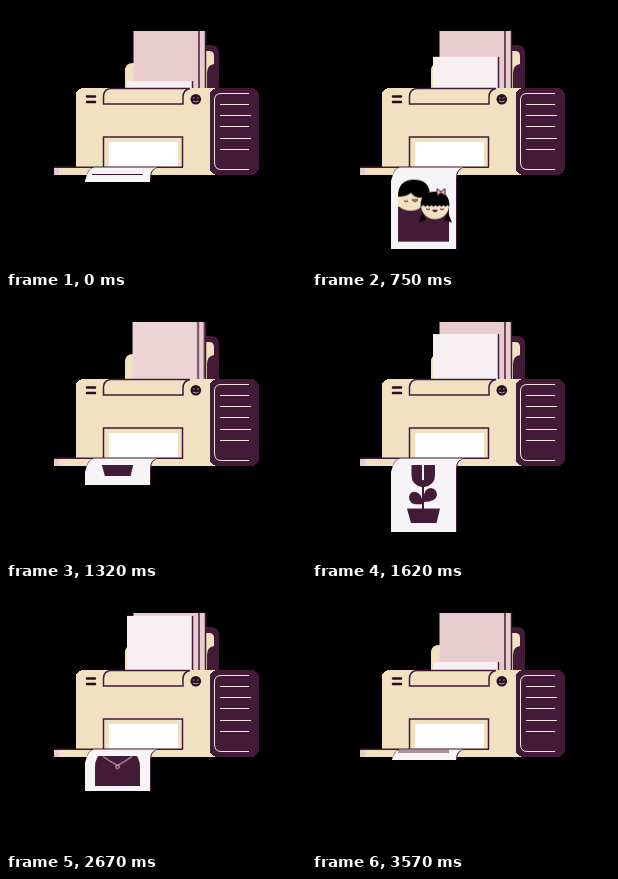
These frames come from a looping animation (300x263 px, 3600 ms). An HTML page:

```html
<!DOCTYPE html>
<html lang="en">
<head>
<meta charset="utf-8">
<title>Photo printer</title>
<style>
html, body { margin: 0; width: 100%; height: 100%; overflow: hidden; background: #000; }
svg { display: block; width: 100vw; height: 100vh; }
.cream { fill: #f0e2c0; }
.pink { fill: #e9cccf; }
.plum { fill: #431a37; }
.white { fill: #f7f4f7; }
.line { fill: none; stroke: #431a37; stroke-width: 1.5; }
.thin { fill: none; stroke: #431a37; }
.crisp { shape-rendering: crispEdges; }

/* Feeder: the stack steps forward, then the front sheet is pulled in */
.feed { animation: feed 1.2s linear -1.1s infinite; }
.shift { animation: shift 1.2s linear -1.1s infinite; }
@keyframes feed {
  0% { transform: translate(7px, 25px); fill: #e9cccf; }
  8.33% { transform: translate(0, 25px); fill: #f7f0f3; }
  16.67% { transform: translate(0, 29px); }
  24.17% { transform: translate(0, 35px); }
  26.67% { transform: translate(0, 37px); }
  36.67% { transform: translate(0, 39px); }
  51.67% { transform: translate(0, 50px); }
  61.67% { transform: translate(0, 53px); }
  76.67%, 79.17% { transform: translate(0, 63px); }
  89.17% { transform: translate(0, 74px); }
  91.67% { transform: translate(0, 75px); fill: #f7f0f3; }
  100% { transform: translate(0, 82px); fill: #f7f0f3; }
}
@keyframes shift {
  0% { transform: translateX(7px); }
  8.33%, 100% { transform: none; }
}

/* Photos: step out over the tray, rest, then drop */
.out, .hair, .band { animation: out 3.6s linear calc(var(--i) * 1.2s - 3.78s) infinite; }
@keyframes out {
  0%, .28% { transform: translateY(79px); }
  .83% { transform: translateY(84px); }
  4.17% { transform: translateY(90px); }
  5% { transform: translateY(94px); }
  6.67% { transform: translateY(96px); }
  10.56% { transform: translateY(120px); }
  13.33% { transform: translateY(122px); }
  15.83% { transform: translateY(145px); }
  16.67% { transform: translateY(153px); }
  20% { transform: translateY(155px); }
  25% { transform: translateY(156px); }
  28.33% { transform: translateY(174px); }
  33.33% { transform: translateY(227px); }
  34.17% { transform: translateY(248px); }
  35.28%, 100% { transform: translateY(268px); }
}
.hair { animation-name: hair; animation-timing-function: step-end; }
@keyframes hair { 0% { fill: #efb4b8; } 20%, 100% { fill: #000; } }
.band { animation-name: band; animation-timing-function: step-end; }
@keyframes band { 0% { opacity: 0; } 2% { opacity: .45; } 4.6%, 100% { opacity: 0; } }
</style>
</head>
<body>
<svg viewBox="0 0 300 263" preserveAspectRatio="none">
  <defs>
    <clipPath id="curl"><path d="M88 161.5H151Q144 163 144 172V263H79V175Q82 162 88 161.5Z"/></clipPath>
    <clipPath id="rim"><path d="M88 161H153Q145 163 145 172V263H79V175Q82 161 88 161Z"/></clipPath>
    <clipPath id="below"><path d="M79 168H145V263H79Z"/></clipPath>
    <path id="sheet" d="M0 0H65V75H0Z"/>
    <path id="paper" d="M79 0H154V82H79Z"/>
  </defs>

  <!-- paper feeder -->
  <path class="plum" d="M190 82V39H205Q213 39 213 47V82Z"/>
  <path class="cream" d="M199 45H203Q208 45 208 50V58Q201 59 201 67V82H199Z"/>
  <path class="cream" d="M119 82V65Q119 57 127 57H195V82Z"/>
  <use href="#sheet" class="pink" x="134" y="25"/>
  <path class="line" d="M199.500 25V82"/>
  <g class="shift pink">
    <use href="#sheet" x="127.500" y="25"/>
    <path class="line" d="M193 25V82"/>
  </g>
  <g class="feed">
    <use href="#sheet" x="121"/>
    <path class="line" d="M186.500 0V75"/>
  </g>

  <!-- printer body -->
  <path class="cream crisp" d="M78 82H215V169H48V161H70V90Q70 82 78 82Z"/>
  <path class="pink crisp" d="M48 162H53V169H48Z"/>
  <path class="line" d="M97.500 98V90Q98 83 105 82.500H184Q177 84 177 91V98Z"/>
  <path d="M81 90.500h8M81 96h8" stroke="#2a0d22" stroke-width="2.500" stroke-linecap="round"/>
  <circle cx="189.800" cy="93.300" r="5.300" fill="#2a0d22"/>
  <path d="M187 92h1.500M191 92h1.500M187 95q2.800 2 5.600 0" fill="none" stroke="#f0e2c0" stroke-width=".7"/>
  <path class="line" d="M97.500 161V131H176.500V161"/>
  <path fill="#fff" d="M103 136H172V160.500H103Z"/>
  <path class="line" d="M48 161.300H177"/>
  <rect class="plum crisp" x="203.500" y="82" width="49.500" height="87" rx="8"/>
  <path d="M243 87.500H215Q208.500 87.500 208.500 94V156Q208.500 163.500 215 163.500H243" fill="none" stroke="#f3e6dc"/>
  <path d="M214 98.500H243M214 109.500H245M214 120.500H243M214 132.500H245M214 143.500H243" stroke="#f3e6dc" stroke-width="1.200"/>

  <!-- couple -->
  <g style="--i:0">
    <g clip-path="url(#rim)"><use href="#paper" class="out plum crisp"/></g>
    <g clip-path="url(#curl)"><use href="#paper" class="out white crisp"/></g>
    <path class="band plum" d="M86 161.500H137V165H86Z"/>
    <g clip-path="url(#below)"><g class="out">
      <path class="plum" d="M86 75V40H137V75Z"/>
      <path class="cream" d="M86 26H113V34Q109 44 99 44Q91 44 86 39Z"/>
      <path class="hair" d="M86 30Q86 13 102 13Q118 13 118 29L109 31Q102 31 99 26Q95 30 86 30Z"/>
      <path class="thin" d="M92 34q2 2 4 0M100 33h6q-3 4-6 0"/>
      <path d="M110 46L107 56L114 53ZM136 46L140 56L132 53Z"/>
      <circle class="cream" cx="123" cy="38.500" r="14"/>
      <path d="M108.500 40Q108 25 123 25Q138 25 137.500 40l-2-1.500-2 1.500-2-1.500-2 1.500-2-1.500-2 1.500-2-1.500-2 1.500-2-1.500-2 1.500-2-1.500-2 1.500-2-1.500Z"/>
      <path class="thin" d="M114 42q2 2 4 0M128 42q2 2 4 0"/>
      <path class="plum" d="M120 43h6q-3 5-6 0Z"/>
      <path d="M125 22l4 3 4-3v7l-4-3-4 3Z" fill="#efb4b8" stroke="#431a37"/>
    </g></g>
  </g>

  <!-- potted tulip -->
  <g style="--i:1">
    <g clip-path="url(#rim)"><use href="#paper" class="out plum crisp"/></g>
    <g clip-path="url(#curl)"><use href="#paper" class="out white crisp"/></g>
    <g clip-path="url(#below)"><g class="out plum">
      <path d="M99.500 15H110V37Q99.500 35 99.500 25ZM112 15H123V25Q123 35 112 37Z"/>
      <path d="M110 30h2v30h-2Z"/>
      <path d="M110.500 54Q97 56 97 47Q98 41 104 42Q110 43 110.500 54ZM111.500 52Q111 38 119 38Q125 39 125 45Q124 52 111.500 52Z"/>
      <path d="M95 58.500H128L124.500 73H99Z"/>
    </g></g>
  </g>

  <!-- dog -->
  <g style="--i:2">
    <g clip-path="url(#rim)"><use href="#paper" class="out plum crisp"/></g>
    <g clip-path="url(#curl)"><use href="#paper" class="out white crisp"/></g>
    <g clip-path="url(#below)"><g class="out">
      <path class="plum" d="M89 77V58Q89 46 98 42V26Q99 14 111.500 14Q124 14 125 26V42Q134 46 134 58V77Z"/>
      <path d="M99 17Q89 21 89 32Q90 39 95 39Q99 35 98 26ZM124 17Q134 21 134 32Q133 39 128 39Q124 35 125 26Z"/>
      <circle class="white" cx="104" cy="26" r="1.800"/>
      <circle class="white" cx="118.500" cy="26" r="1.800"/>
      <path class="white" d="M107 30Q111.500 27 116 30L114.500 38H108.500Z"/>
      <path d="M108.500 29h6l-3 4ZM110 34h3v5h-3Z"/>
      <path d="M97 47Q104 52 111.500 56Q119 52 126 47" fill="none" stroke="#e9cccf"/>
      <circle cx="111.500" cy="57.500" r="1.800" fill="none" stroke="#e9cccf"/>
    </g></g>
  </g>
</svg>
</body>
</html>
```
